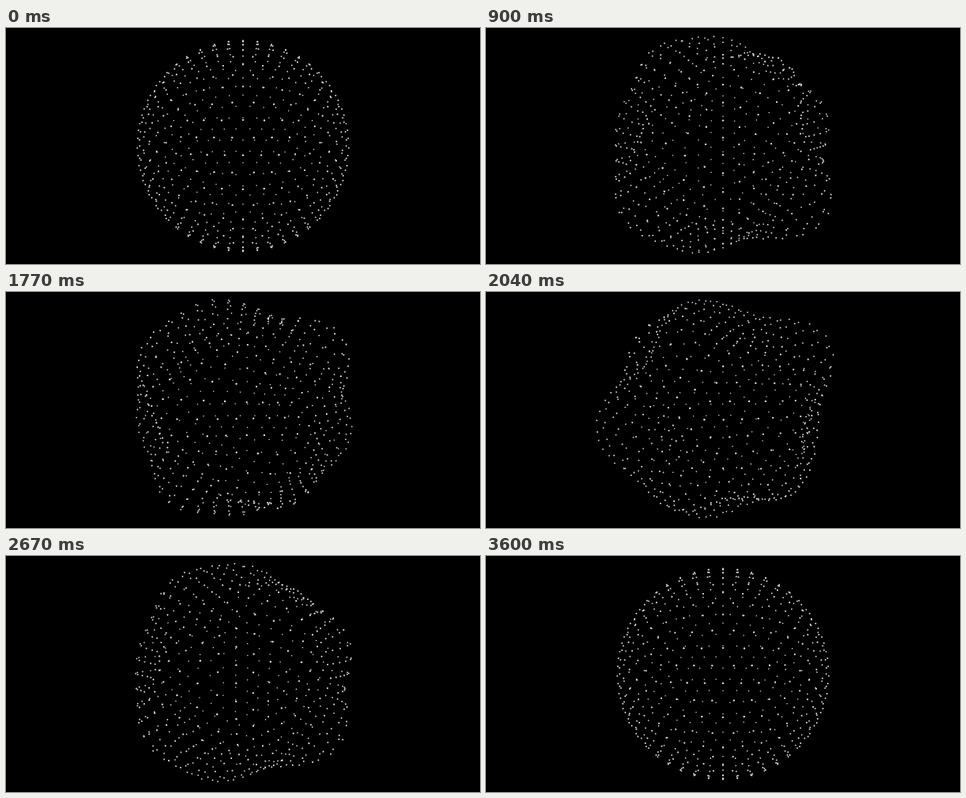
Animation, 600 px wide and 300 px high, one loop 3.63 s. Source, as an HTML page with a canvas:

```html
<!DOCTYPE html>
<html lang="en">
<head>
<meta charset="utf-8">
<title>Point sphere</title>
<style>
html, body { margin: 0; width: 100%; height: 100%; overflow: hidden; background: #000; }
canvas { display: block; }
</style>
</head>
<body>
<canvas id="stage" width="600" height="300"></canvas>
<script>
const ctx = document.getElementById('stage').getContext('2d');
const LOOP = 3630, STEP = 30, LAST = 3600;
const RADIUS = 134, DISTANCE = 4.5, TILT = 0.07;
const FOCAL = RADIUS * Math.sqrt(DISTANCE * DISTANCE - 1);
const TAU = Math.PI * 2;

const normalize = p => {
  const length = Math.hypot(...p);
  return p.map(v => v / length);
};
const dot = (a, b) => a[0] * b[0] + a[1] * b[1] + a[2] * b[2];
const rotate = (u, v, angle) => {
  const c = Math.cos(angle), s = Math.sin(angle);
  return [u * c + v * s, v * c - u * s];
};

// Icosahedron with an edge on top, subdivided by edge midpoints.
function icosphere(levels) {
  const golden = (1 + Math.sqrt(5)) / 2;
  const points = [];
  for (const a of [-1, 1]) {
    for (const b of [-golden, golden]) {
      points.push([0, b, a], [a, 0, b], [b, a, 0]);
    }
  }
  points.forEach((p, i) => { points[i] = normalize(p); });

  const adjacent = (i, j) => dot(points[i], points[j]) > 0.4;
  let faces = [];
  for (let i = 0; i < 12; i++)
    for (let j = i + 1; j < 12; j++)
      for (let k = j + 1; k < 12; k++)
        if (adjacent(i, j) && adjacent(j, k) && adjacent(i, k)) faces.push([i, j, k]);

  for (let n = 0; n < levels; n++) {
    const known = new Map();
    const middle = (a, b) => {
      const key = Math.min(a, b) + ':' + Math.max(a, b);
      if (!known.has(key)) {
        known.set(key, points.length);
        points.push(normalize(points[a].map((v, i) => v + points[b][i])));
      }
      return known.get(key);
    };
    faces = faces.flatMap(([a, b, c]) => {
      const ab = middle(a, b), bc = middle(b, c), ca = middle(c, a);
      return [[a, ab, ca], [b, bc, ab], [c, ca, bc], [ab, bc, ca]];
    });
  }
  return points;
}

const points = icosphere(3);
const waves = [[1, 1, 1], [1, -1, -1], [-1, 1, -1], [-1, -1, 1]].map(normalize);

const smooth = (from, to, t) => {
  const u = Math.min(1, Math.max(0, (t - from) / (to - from)));
  return u * u * (3 - 2 * u);
};

const bump = (p, phase) => waves.reduce(
  (sum, wave, i) => sum + Math.sin(6 * dot(wave, p) + 1.7 * i + phase * TAU), 0);

function draw(time) {
  const phase = time / LAST;
  const strength = 0.06 * smooth(300, 950, time) * (1 - smooth(2450, 3200, time));

  ctx.fillStyle = '#000';
  ctx.fillRect(0, 0, 600, 300);
  ctx.fillStyle = '#ddd';
  for (const p of points) {
    const r = 1 + strength * (bump(p, phase) + 0.3);
    const [x, depth] = rotate(p[0], p[2], phase * TAU);
    const [y, z] = rotate(p[1], depth, -TILT);
    const scale = FOCAL / (DISTANCE - z * r);
    ctx.beginPath();
    ctx.arc(300 + x * r * scale, 150 - y * r * scale, 0.95 * scale / RADIUS, 0, TAU);
    ctx.fill();
  }
}

const start = performance.now();
function tick() {
  const time = (performance.now() - start) % LOOP;
  draw(Math.floor(time / STEP) * STEP);
  requestAnimationFrame(tick);
}
tick();
</script>
</body>
</html>
```
